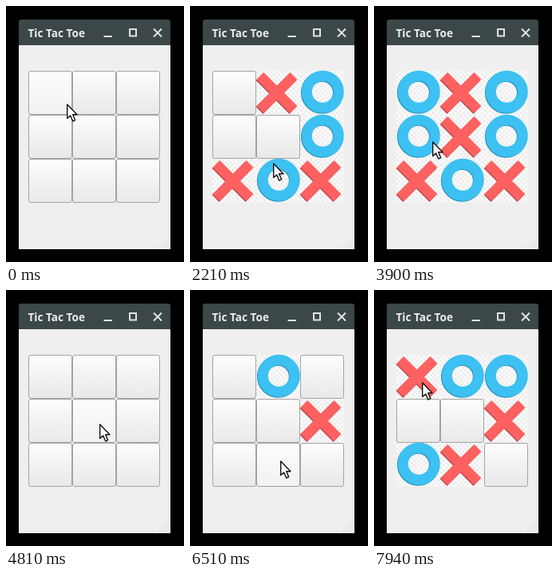
An HTML page with a canvas for the animation above (8000 ms loop, 223x320 px).

```html
<!DOCTYPE html>
<html lang="en">
<head>
<meta charset="utf-8">
<title>Tic Tac Toe</title>
<style>
  html, body { margin: 0; width: 100%; height: 100%; overflow: hidden; background: #000; }
  canvas { display: block; }
</style>
</head>
<body>
<canvas id="stage" width="223" height="320"></canvas>
<script>
const ctx = document.getElementById('stage').getContext('2d');
const LOOP = 8000, STEP = 130, GAME_OVER = 4030, RESTART = 4810;
const CELL = 55, LEFT = 28, TOP = 81;

// The player's clicks, each with the cell of the computer's reply
const clicks = [
  { time: 650, x: 156, y: 112, reply: 8 },
  { time: 1170, x: 155, y: 169, reply: 6 },
  { time: 1820, x: 114, y: 215, reply: 1 },
  { time: 3120, x: 62, y: 121, reply: 4 },
  { time: 3900, x: 73, y: 169 },
  { time: 5850, x: 160, y: 164, reply: 1 },
  { time: 6900, x: 108, y: 219, reply: 2 },
  { time: 7940, x: 60, y: 115, reply: 6 }
];

const cellAt = (x, y) => Math.floor((x - LEFT) / CELL) + 3 * Math.floor((y - TOP) / CELL);

// The pointer rests around each click and eases over to the next
function pointerAt(t) {
  const i = clicks.findIndex(c => c.time > t);
  const to = clicks.at(i);
  const from = i < 0 ? to : clicks[i - 1] || { time: -STEP, x: 76, y: 122 };
  const start = from.time + STEP, end = to.time - 2 * STEP;
  const k = end > start ? Math.min(1, Math.max(0, (t - start) / (end - start))) : 1;
  const ease = k * k * (3 - 2 * k);
  return [from.x + (to.x - from.x) * ease, from.y + (to.y - from.y) * ease].map(Math.round);
}

function boardAt(t) {
  const second = t >= RESTART;
  const [player, computer] = second ? 'XO' : 'OX';
  const marks = [];
  let pressed = -1;
  for (const { time, x, y, reply } of clicks) {
    if (time >= RESTART !== second) continue;
    const cell = cellAt(x, y);
    if (t >= time) {
      marks[cell] = player;
      if (reply !== undefined) marks[reply] = computer;
    } else if (t >= time - STEP) pressed = cell;
  }
  return { marks, pressed };
}

function line(points, close) {
  ctx.beginPath();
  points.forEach(([x, y]) => ctx.lineTo(x, y));
  if (close) ctx.closePath();
}

function drawCross(x, y, radius, width, color) {
  ctx.strokeStyle = color;
  ctx.lineWidth = width;
  for (const s of [-1, 1]) {
    line([[x - radius, y - radius * s], [x + radius, y + radius * s]]);
    ctx.stroke();
  }
}

function drawRing(x, y, color) {
  ctx.strokeStyle = color;
  ctx.lineWidth = 13;
  ctx.beginPath();
  ctx.arc(x, y, 20, 0, Math.PI * 2);
  ctx.stroke();
}

function drawWindow(active) {
  ctx.fillStyle = '#000';
  ctx.fillRect(0, 0, 223, 320);
  ctx.fillStyle = '#efefef';
  ctx.fillRect(16, 49, 190, 255);
  ctx.fillStyle = '#3b4748';
  ctx.beginPath();
  ctx.roundRect(16, 17, 190, 32, [3, 3, 0, 0]);
  ctx.fill();

  ctx.fillStyle = active ? '#ecedeb' : '#a2aaab';
  ctx.font = '700 13.6px "Open Sans", sans-serif';
  ctx.fillText('Tic Tac Toe', 27.5, 38.5);

  ctx.strokeStyle = active ? '#dfe2e2' : '#a2aaab';
  ctx.lineWidth = 2;
  line([[122.5, 38], [133, 38]]);
  ctx.stroke();
  ctx.strokeRect(155, 29, 8, 8.5);
  drawCross(190, 33.5, 5, 2, ctx.strokeStyle);

  ctx.fillStyle = '#c4c4c4';
  for (let r = 0; r < 4; r++)
    for (let c = 3 - r; c < 4; c++) ctx.fillRect(192 + c * 3, 291 + r * 3, 1, 1);
}

function drawButton(x, y, pressed, hover) {
  const fill = ctx.createLinearGradient(0, y, 0, y + CELL);
  fill.addColorStop(0, pressed ? '#d8d8d8' : '#fdfdfd');
  fill.addColorStop(1, pressed ? '#dcdcdc' : hover ? '#f1f1f1' : '#e8e8e8');
  ctx.beginPath();
  ctx.roundRect(x + 0.5, y + 0.5, CELL - 1, CELL - 1, 2.5);
  ctx.fillStyle = fill;
  ctx.fill();
  ctx.strokeStyle = '#a3a3a3';
  ctx.lineWidth = 1;
  ctx.stroke();
}

function drawChecks(x, y) {
  ctx.fillStyle = '#fafafa';
  ctx.fillRect(x, y, CELL, CELL);
  ctx.fillStyle = '#eeeeee';
  for (let j = 0; j < CELL; j += 3)
    for (let i = j % 2 * 3; i < CELL; i += 6)
      ctx.fillRect(x + i, y + j, Math.min(3, CELL - i), Math.min(3, CELL - j));
}

function drawMark(mark, x, y) {
  drawChecks(x, y);
  if (mark === 'X') {
    drawCross(x + 25, y + 28.5, 21, 12.5, '#bd4d4f');
    drawCross(x + 26, y + 27.3, 21, 12.5, '#ff6161');
  } else {
    drawRing(x + 27.4, y + 27.2, '#2693bd');
    drawRing(x + 28.3, y + 26.2, '#3dc1f2');
  }
}

function drawPointer(x, y) {
  line([[0, 0], [0, 17.5], [4, 14], [7, 21], [10, 19.7], [7, 12.8], [12.3, 12.8]]
    .map(([dx, dy]) => [x + dx + 0.7, y + dy + 1]), true);
  ctx.fillStyle = '#fff';
  ctx.fill();
  ctx.strokeStyle = '#111';
  ctx.lineWidth = 1.4;
  ctx.lineJoin = 'round';
  ctx.stroke();
  ctx.lineJoin = 'miter';
}

function draw(now) {
  const time = now % LOOP;
  const shift = time >= 5990 ? 10 : 0;
  const t = Math.floor((time - shift) / STEP) * STEP + shift;
  const [px, py] = pointerAt(t);
  const { marks, pressed } = boardAt(t);

  drawWindow(t < GAME_OVER || t >= RESTART);
  for (let i = 0; i < 9; i++) {
    const x = LEFT + i % 3 * CELL, y = TOP + Math.floor(i / 3) * CELL;
    if (marks[i]) drawMark(marks[i], x, y);
    else drawButton(x, y, pressed === i, cellAt(px, py) === i);
  }
  drawPointer(px, py);
  requestAnimationFrame(draw);
}
requestAnimationFrame(draw);
</script>
</body>
</html>
```
